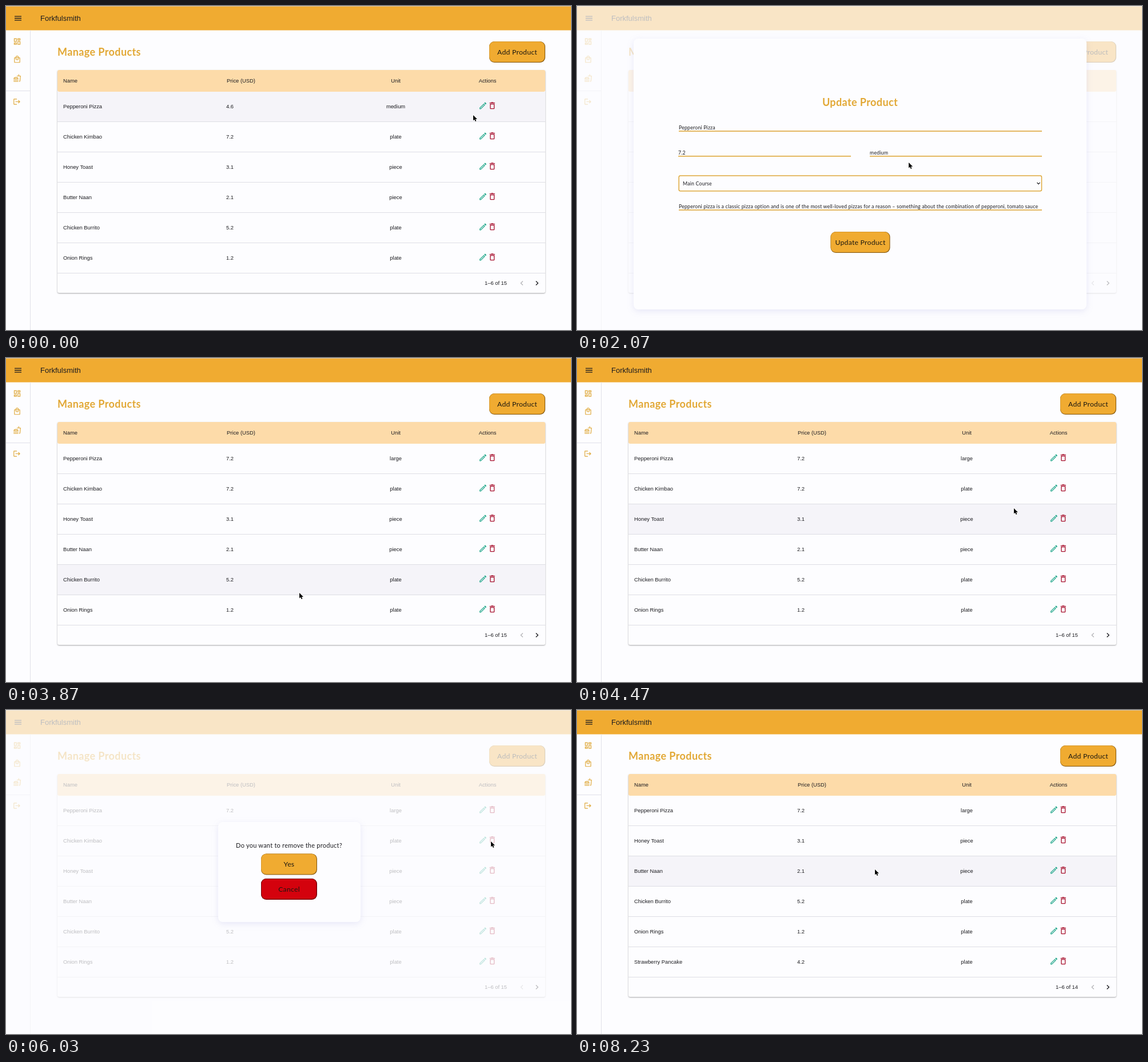
Animation of 988x567 px, one loop 8260 ms. Source, as an HTML page:

```html
<!DOCTYPE html>
<html lang="en">
<head>
<meta charset="utf-8">
<title>Manage products</title>
<style>
  html, body { margin: 0; width: 100%; height: 100%; overflow: hidden; background: #fdfdff; }
  svg { display: block; }
  text { font: 9.35px "Liberation Sans", Arial, sans-serif; fill: #1c1c20; white-space: pre; }
  .round { font-family: Lato, "Open Sans", sans-serif; letter-spacing: .022em; }
  .head { font-size: 18px; font-weight: 700; fill: #e2a835; }
  .button { font-size: 12.2px; }
  .ask { font-size: 11px; }
  .field { font-size: 8.75px; }
  .title { font-size: 13px; }
  .mid { text-anchor: middle; }
  .card { fill: #fdfdff; filter: drop-shadow(0 3px 6px rgba(90, 90, 190, .13)); }
</style>
</head>
<body>
<svg id="stage" width="988" height="567" viewBox="0 0 988 567">
  <g id="page"></g>
  <g id="modal"></g>
  <path id="cursor" d="M0 0v9.6l2.2-2 1.5 3.4 1.7-.7-1.5-3.3h3.1z" stroke="#fff" stroke-width="1.4" paint-order="stroke"/>
</svg>
<script>
const LOOP = 8260;
const GOLD = '#f0ab31', LINE = '#dfa93c', PEACH = '#fddba9', EDGE = '#8a5c12', RULE = '#e1e1e8';

// Times of the hard changes
const EDIT_OPEN = 560, EDIT_CLOSE = 3600, ASK_OPEN = 5950, ASK_CLOSE = 7900;

const path = [ // time, x, y
  [0, 817, 191], [330, 834, 177], [640, 834, 177], [1000, 230, 261], [1780, 230, 261],
  [2070, 580, 274], [2250, 640, 259], [2880, 640, 259], [3260, 513, 411], [3900, 513, 411],
  [4470, 764, 263], [5000, 848, 230], [6200, 848, 230], [6950, 521, 279], [LOOP, 521, 279]
];

const foods = [
  ['Pepperoni Pizza', '4.6', 'medium'], ['Chicken Kimbao', '7.2', 'plate'],
  ['Honey Toast', '3.1', 'piece'], ['Butter Naan', '2.1', 'piece'],
  ['Chicken Burrito', '5.2', 'plate'], ['Onion Rings', '1.2', 'plate'],
  ['Strawberry Pancake', '4.2', 'plate']
];

const icons = {
  menu: 'M3 18h18v-2H3v2zm0-5h18v-2H3v2zm0-7v2h18V6H3z',
  board: 'M19 5v2h-4V5h4M9 5v6H5V5h4m10 8v6h-4v-6h4M9 17v2H5v-2h4M21 3h-8v6h8V3zM11 3H3v10h8V3zm10 8h-8v10h8V11zm-10 4H3v6h8v-6z',
  bag: 'M19 6h-2c0-2.76-2.24-5-5-5S7 3.24 7 6H5c-1.1 0-2 .9-2 2v12c0 1.1.9 2 2 2h14c1.1 0 2-.9 2-2V8c0-1.1-.9-2-2-2zm-7-3c1.66 0 3 1.34 3 3H9c0-1.66 1.34-3 3-3zm7 17H5V8h14v12zm-7-8c-1.66 0-3-1.34-3-3H7c0 2.76 2.24 5 5 5s5-2.24 5-5h-2c0 1.66-1.34 3-3 3z',
  food: 'M1 22c0 .56.45 1 1 1H15c.56 0 1-.45 1-1V21H1zM8.5 9C4.75 9 1 11 1 15h15c0-4-3.75-6-7.5-6zM3.62 13c1.11-1.55 3.47-2 4.88-2s3.77.46 4.88 2zM1 17h15v2H1zM18 5V1h-2v4h-5l.23 2h9.56l-1.4 14H18v2h1.72c.84 0 1.53-.65 1.63-1.47L23 5z',
  exit: 'M17 7l-1.41 1.41L18.17 11H8v2h10.17l-2.58 2.58L17 17l5-5zM4 5h8V3H4c-1.1 0-2 .9-2 2v14c0 1.1.9 2 2 2h8v-2H4V5z',
  pencil: 'M14.06 9.02l.92.92L5.92 19H5v-.92l9.06-9.06M17.66 3c-.25 0-.51.1-.7.29l-1.83 1.83 3.75 3.75 1.83-1.83c.39-.39.39-1.02 0-1.41l-2.34-2.34c-.2-.2-.45-.29-.71-.29zm-3.6 3.19L3 17.25V21h3.75L17.81 9.94l-3.75-3.75z',
  trash: 'M6 19c0 1.1.9 2 2 2h8c1.1 0 2-.9 2-2V7H6v12zM8 9h8v10H8V9zm7.5-5l-1-1h-5l-1 1H5v2h14V4z',
  prev: 'M15.41 7.41L14 6l-6 6 6 6 1.41-1.41L10.83 12z',
  next: 'M10 6L8.59 7.41 13.17 12l-4.58 4.59L10 18l6-6z'
};

const text = (s, x, y, cls = '', extra = '') => `<text class="${cls}" x="${x}" y="${y}" ${extra}>${s}</text>`;
const rect = (x, y, w, h, fill, r = 0, extra = '') =>
  `<rect x="${x}" y="${y}" width="${w}" height="${h}" rx="${r}" fill="${fill}" ${extra}/>`;
const icon = (name, cx, cy, fill, size = 16) =>
  `<path d="${icons[name]}" fill="${fill}" transform="translate(${cx - size / 2} ${cy - size / 2}) scale(${size / 24})"/>`;

function button(label, x, y, w, hover, face = GOLD, dark = EDGE) {
  const h = 37;
  const [low, high, fill, ink] = hover ? [LINE, '#6b4a12', PEACH, LINE] : [dark, face === GOLD ? '#d99a2c' : dark, face, '#1c1810'];
  return rect(x, y, w, h, low, 9) + rect(x, y, w - 1, h - 1, high, 9) +
    rect(x + 1, y + 1, w - 2.5, h - 2.5, fill, 8) +
    text(label, x + w / 2, y + 22.8, 'round button mid', `style="fill:${ink}"`);
}

function drawPage({ rows, total, hoverRow }) {
  let s = rect(0, 0, 988, 42.5, GOLD) + rect(0, 0, 988, 1, '#d8c4a4') +
    icon('menu', 21, 21.5, '#1c1c20') + text('Forkfulsmith', 60, 26, 'title') +
    rect(42, 42.5, 1, 525, RULE) + rect(0, 148, 42, 1, RULE) +
    icon('board', 19.5, 62, LINE, 15) + icon('bag', 19.5, 93.5, LINE, 14) +
    icon('food', 19.5, 126, LINE, 14) + icon('exit', 19, 167.5, LINE, 14) +
    text('Manage Products', 90, 87, 'round head') + button('Add Product', 845, 62, 98, false) +
    rect(90, 112, 853, 390, '#fdfdff', 3, 'style="filter:drop-shadow(0 1px 1px rgba(0,0,0,.35))"') +
    rect(90, 112, 853, 38, PEACH, 3) +
    text('Name', 100, 134.2) + text('Price (USD)', 386, 134.2) +
    text('Unit', 681.5, 134.2, 'mid') + text('Actions', 842, 134.2, 'mid');
  rows.forEach(([name, price, unit], i) => {
    const y = 150 + 53 * i;
    if (i === hoverRow) s += rect(90, y, 853, 52, '#f5f4f9');
    s += rect(90, y + 52, 853, 1, '#dedee4') + text(name, 100, y + 29.2) + text(price, 385, y + 29.2) +
      text(unit, 681.5, y + 29.2, 'mid') + icon('pencil', 834, y + 24.5, '#2cab90') + icon('trash', 850.3, y + 24.3, '#a8122f');
  });
  return s + text(`1–6 of ${total}`, 856.5, 488.4, 'mid') +
    icon('prev', 902, 485, '#b4b4b8') + icon('next', 928.5, 485, '#1c1c20');
}

function drawEdit({ price, unit, overButton }) {
  const rule = (x, y, w) => rect(x, y, w, 1.6, LINE);
  return rect(99, 57, 792, 474, '', 8, 'class="card"') +
    text('Update Product', 495, 175, 'round head mid') +
    text('Pepperoni Pizza', 178, 216, 'round field') + rule(178, 218.2, 635) +
    text(price, 177, 260, 'round field') + rule(177, 262, 302) +
    text(unit, 512, 260, 'round field') + rule(512, 262, 301) +
    rect(178.2, 297, 634.3, 26.8, 'none', 2.5, `stroke="${LINE}" stroke-width="1.5"`) +
    text('Main Course', 185, 313.8, 'round field') +
    '<path d="M804.5 309l2.5 2.6 2.5-2.6" fill="none" stroke="#1c1c20" stroke-width="1.2"/>' +
    '<svg x="177" y="340" width="636" height="17">' +
    text('Pepperoni pizza is a classic pizza option and is one of the most well-loved pizzas for a reason – something about the combination of pepperoni, tomato sauce', 1, 14.3, 'round field') +
    '</svg>' + rule(178, 356.2, 635) + button('Update Product', 443.5, 395, 104, overButton);
}

const drawAsk = ({ overButton }) =>
  rect(371, 196, 249, 175, '', 8, 'class="card"') +
  text('Do you want to remove the product?', 495, 241, 'round ask mid') +
  button('Yes', 446, 251.5, 98, overButton) + button('Cancel', 446, 295, 98, false, '#d4020d', '#7c0008');

// Backspaces one word, then types the other, a key every `step` ms
function retype(from, to, t, start, step) {
  const keys = Math.max(0, Math.floor((t - start) / step));
  return keys < from.length ? from.slice(0, from.length - keys) : to.slice(0, keys - from.length);
}

function cursorAt(t) {
  const i = path.findIndex(k => k[0] > t);
  const [t0, x0, y0] = path[i - 1], [t1, x1, y1] = path[i];
  const p = (t - t0) / (t1 - t0), e = p * p * (3 - 2 * p);
  return [x0 + (x1 - x0) * e, y0 + (y1 - y0) * e];
}

function stateAt(t, x, y) {
  const mode = t >= EDIT_OPEN && t < EDIT_CLOSE ? 'edit' : t >= ASK_OPEN && t < ASK_CLOSE ? 'ask' : '';
  const inside = (l, top, w, h) => x >= l && x < l + w && y >= top && y < top + h;
  const rows = foods.slice();
  if (t >= EDIT_CLOSE) rows[0] = ['Pepperoni Pizza', '7.2', 'large'];
  const removed = t >= ASK_CLOSE;
  if (removed) rows.splice(1, 1);
  return {
    mode,
    rows: rows.slice(0, 6),
    total: removed ? 14 : 15,
    hoverRow: !mode && inside(90, 150, 853, 318) ? Math.floor((y - 150) / 53) : -1,
    price: retype('4.6', '7.2', t, 1080, 95),
    unit: retype('medium', 'large', t, 2250, 50),
    overButton: mode === 'edit' ? inside(443, 395, 104, 37) : inside(446, 251, 98, 37)
  };
}

const [page, modal, cursor] = ['page', 'modal', 'cursor'].map(id => document.getElementById(id));
const veil = rect(0, 0, 988, 567, 'rgba(253,253,255,.72)');
const begin = performance.now();
let shown = '';

function frame() {
  const t = (performance.now() - begin) % LOOP;
  const [x, y] = cursorAt(t);
  const state = stateAt(t, x, y), key = JSON.stringify(state);
  if (key !== shown) {
    page.innerHTML = drawPage(state);
    modal.innerHTML = state.mode ? veil + (state.mode === 'edit' ? drawEdit : drawAsk)(state) : '';
    shown = key;
  }
  cursor.setAttribute('transform', `translate(${x} ${y})`);
  requestAnimationFrame(frame);
}
frame();
</script>
</body>
</html>
```
